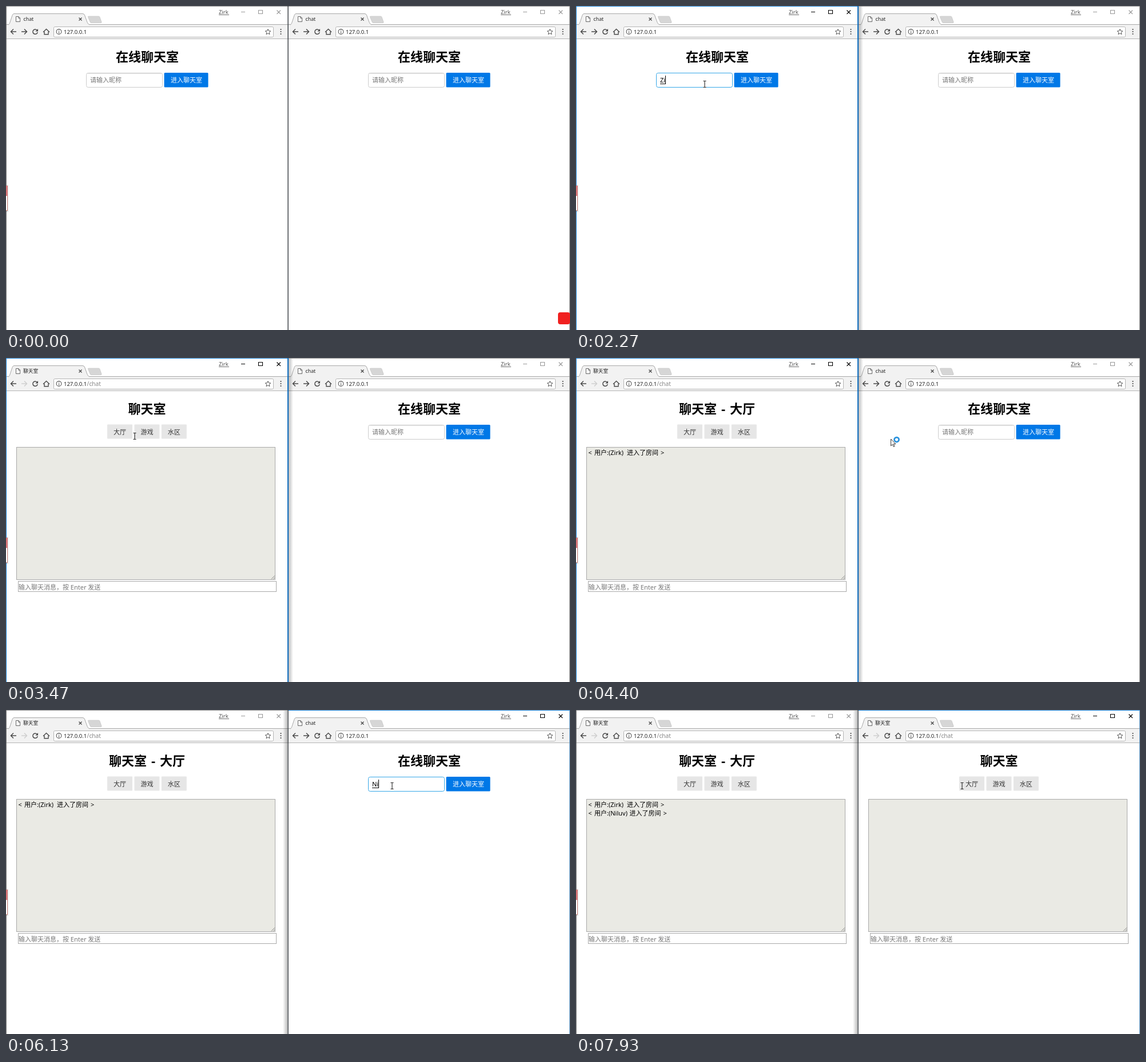
An HTML page for the animation above (8 s loop, 986 by 568 pixels).

```html
<!DOCTYPE html>
<html lang="zh-CN">
<head>
<meta charset="utf-8">
<style>
html, body { margin: 0; width: 100%; height: 100%; overflow: hidden; background: #fff; }
svg { display: block; width: 986px; height: 568px; }
text { font-family: "Noto Sans", "Noto Sans CJK SC", sans-serif; white-space: pre; }
</style>
</head>
<body>
<svg id="stage" viewBox="0 0 986 568"></svg>
<script>
const stage = document.getElementById('stage');
const LOOP = 8000, STEP = 1000 / 15, HALF = 493;
const pen = document.createElement('canvas').getContext('2d');
pen.font = '11px "Noto Sans", "Noto Sans CJK SC", sans-serif';

// Timeline of each window: key times, and the blink phases when the caret is hidden
const users = [
  { name: 'Zirk', keys: [1800, 2270, 2400, 2600], commit: 3000, focus: 930,
    load: 3270, page: 3470, joined: 3670, hidden: [[1470, 1800]] },
  { name: 'Niluv', keys: [5930, 6130, 6270, 6400, 6670], commit: 6670, focus: 4730,
    load: 7400, page: 7730, joined: 7930, hidden: [[5270, 5800], [7200, 7400]] }
];

const text = (x, y, s, size = 11, fill = '#000', more = '') =>
  `<text x="${x}" y="${y}" font-size="${size}" fill="${fill}" ${more}>${s}</text>`;
const rect = (x, y, w, h, fill, more = '') =>
  `<rect x="${x}" y="${y}" width="${w}" height="${h}" fill="${fill}" ${more}/>`;
const line = (d, color, width = 1, more = '') =>
  `<path d="${d}" fill="none" stroke="${color}" stroke-width="${width}" ${more}/>`;
const group = (x, y, body) => `<g transform="translate(${x} ${y})">${body}</g>`;
const title = (x, s) => text(x, 97, s, 22, '#000', 'font-weight="700"');

function spinner(t) {
  const turn = -(t - 7670) * 0.36;
  return line('M19 19.6Q20.5 18.4 22.5 18.6', '#888', 1.2, `transform="rotate(${turn} 21 23)"`);
}

function chrome(u, t, active) {
  const loading = t >= u.load && t < u.page, moved = t >= u.load;
  const ink = '#4a4a4a', frame = active ? '#000' : '#999';
  let s = rect(0, 33, HALF, 24.5, '#f2f2f2') + line('M0 32.5H493', '#a8a8a8');
  s += '<path d="M4 33C6 32 6.5 30 7.5 27L11 16.5Q12 13.5 14 13.5H134Q136.5 13.5 137.5 16L142 28.5Q143.5 32 146 33" fill="#f2f2f2" stroke="#a8a8a8"/>';
  s += rect(5.5, 32.6, 139, 1, '#f2f2f2');
  s += '<path d="M144 18H162Q163.5 18 164 19.5L167 28Q167.5 29.5 166 29.5H149Q147.5 29.5 147 28L143.5 19.5Q143 18 144 18Z" fill="#d6d6d6" stroke="#c4c4c4" stroke-width=".7"/>';
  s += line('M0 57.5H493', '#b4b4b4');
  s += loading ? spinner(t)
    : '<path d="M17.5 18.5H22L24.5 21V27.5H17.5ZM21.8 18.5V21.3H24.5" fill="#fff" stroke="#555" stroke-width=".9"/>';
  s += loading ? text(31, 26.2, '127.0.0.1/chat', 8.4, '#222')
    : moved ? text(30, 26.3, '聊天室', 8.7, '#222') : text(30.5, 26.2, 'chat', 8.8, '#222');
  s += line('M127.5 20.5L132.5 25.5M132.5 20.5L127.5 25.5', '#444', 1.2);

  // navigation buttons
  s += line('M18 45H9M13 40.5L8.5 45L13 49.5', ink, 1.5);
  s += line('M27 45H36M32 40.5L36.5 45L32 49.5', moved ? '#cfcfcf' : ink, 1.5);
  s += loading ? line('M47.5 41.5L54.5 48.5M54.5 41.5L47.5 48.5', ink, 1.5)
    : line('M54.2 42.3A4.2 4.2 0 1 0 55.2 46', ink, 1.5) + '<path d="M56 40V44.5H51.5Z" fill="#4a4a4a"/>';
  s += line('M65 45.7L70.5 40.5L76 45.7M67 45V49.7H74V45', ink, 1.4);
  s += rect(83.5, 36.5, 384, 18, '#fff', 'rx="2" stroke="#b4b4b4"');
  s += '<circle cx="92.5" cy="45" r="4.4" fill="none" stroke="#555" stroke-width="1.1"/>';
  s += rect(92, 42.4, 1.1, 1.2, '#555') + rect(92, 44.5, 1.1, 3.2, '#555');
  s += text(101, 48.6, '127.0.0.1', 9.5, '#222');
  if (moved) s += text(141.6, 48.6, '/chat', 10.2, '#888');
  s += line('M458 40.5l1.4 3.2 3.4.3-2.6 2.3.8 3.4-3-1.8-3 1.8.8-3.4-2.6-2.3 3.4-.3z', '#555');
  for (const y of [41, 45, 49]) s += `<circle cx="480.5" cy="${y}" r="1.1" fill="#444"/>`;

  // title bar
  s += text(372, 14, users[0].name, 9.4, '#555') + line('M372 15.5H390', '#666', .9);
  s += line('M411 10.5H418M441.5 7.5H448.5V13.5H441.5ZM473.5 7.5L480 14M480 7.5L473.5 14', frame, 1.1);
  return s;
}

function login(u, t) {
  const focused = t >= u.focus;
  const typed = u.name.slice(0, u.keys.filter(k => t >= k).length);
  const end = typed ? 147 + pen.measureText(typed).width : 146;
  let s = title(192, '在线聊天室');
  s += rect(140.5, 117.5, 133, 25, '#fff', `rx="3" stroke="${focused ? '#35a7e8' : '#ccc'}"`);
  if (!focused) s += line('M142 118.5H272', '#e4e4e4');
  s += typed ? text(147, 134, typed) : text(147, 134.3, '请输入昵称', 11, '#777');
  if (typed && t < u.commit) s += line(`M147 136.5H${end}`, '#000');
  if (focused && !u.hidden.some(([a, b]) => t >= a && t < b))
    s += rect(Math.round(end), 122, 1, 15, '#000');
  return s + rect(276.5, 117, 77, 25.5, '#0078e7', 'rx="1.5"') + text(288, 134.3, '进入聊天室', 11, '#fff');
}

function message(name, y) {
  return text(21.5, y, '&lt;') + text(32, y, `用户:(${name})`) +
    text(name.length > 4 ? 93.5 : 89, y, '进入了房间') + text(name.length > 4 ? 152.5 : 148, y, '&gt;');
}

function room(u, t) {
  const inRoom = t >= u.joined && u === users[0];
  let s = inRoom ? title(180, '聊天室') + title(254, '-') + title(269, '大厅') : title(213.5, '聊天室');
  ['大厅', '游戏', '水区'].forEach((label, i) => {
    const x = 177 + i * 47.4;
    s += rect(x, 116.5, 44, 25, '#e6e6e6', 'rx="1"') + text(x + 11, 133.7, label, 11, '#333');
  });
  s += rect(18.5, 156.5, 452, 232, '#eaeae4', 'stroke="#a9a9a9"');
  s += line('M464 387.5L470 381.5M467.5 387.5L470 385', '#777', .9);
  s += rect(21.5, 391.5, 451, 18, '#fff', 'stroke="#a9a9a9"');
  s += text(22, 405.5, '输入聊天消息，按 Enter 发送', 11, '#777');
  if (inRoom) users.forEach((v, i) => {
    if (t >= v.joined) s += message(v.name, 170 + i * 14.5);
  });
  return s;
}

// Eased glide between two points with a slight bulge
function glide(t, start, end, a, b, power, bulge) {
  const u = Math.min(1, Math.max(0, (t - start) / (end - start)));
  const e = 1 - (1 - u) ** power;
  return [a[0] + (b[0] - a[0]) * e, a[1] + (b[1] - a[1]) * e + bulge * Math.sin(Math.PI * u)];
}

function pointer(t) {
  const q = Math.floor((t + 4) / STEP) * STEP;
  if (t < 130) return '';
  const [x, y] = t < 4200
    ? glide(q, 67, 800, [780, 575], [225, 137], 1.9, 0)
    : glide(q, 4133, 4667, [225, 137], [675, 132.5], 1.86, 8.3);
  const loading = users.some(u => t >= u.load && t < u.page);
  const local = x % HALF;
  const beam = !loading && (local > 140 && local < 274 && y > 117 && y < 143) && (t < 4200 || x > HALF);
  if (beam) return group(Math.round(x), Math.round(y), line('M-2.5 -5.5H-.5L0 -5L.5 -5.5H2.5M0 -5V5M-2.5 5.5H-.5L0 5L.5 5.5H2.5', '#222', 1.1));
  const busy = t >= 4270 && t < 4670 && x > HALF;
  return group(x - .5, y, '<path d="M0 0V12L2.8 9.4L4.7 13.6L6.5 12.8L4.6 8.7H8.4Z" fill="#fff" stroke="#222" stroke-width=".9"/>' +
    (busy ? '<circle cx="10" cy="1" r="4" fill="#fff" stroke="#2b93dd" stroke-width="2.8"/>' : ''));
}

const shadow = `<defs><linearGradient id="shade">
  <stop offset="0" stop-color="#000" stop-opacity=".26"/><stop offset="1" stop-color="#000" stop-opacity="0"/>
</linearGradient></defs>`;

function borders(active) {
  const edge = i => active === i ? '#1580d8' : '#909090';
  let s = line('M0 .5H493', edge(0)) + line('M493 .5H986', edge(1));
  s += line('M.5 0V568', active === 0 ? '#1580d8' : '#777') + line('M985.5 0V568', active === 1 ? '#4a88bb' : '#777');
  if (active === 0) s += rect(494, 1, 8, 567, 'url(#shade)');
  if (active === 1) s += rect(-492, 1, 8, 567, 'url(#shade)', 'transform="scale(-1 1)"');
  return s + (active === 0 ? rect(492, 0, 2, 568, '#0f6cbd') : rect(492.4, 0, 1.4, 568, '#33393e'));
}

function scene(t) {
  const active = t < 870 ? -1 : t < 4670 ? 0 : 1;
  let s = shadow + rect(0, 0, 986, 568, '#fff');
  users.forEach((u, i) => {
    s += group(i * HALF, 0, chrome(u, t, active === i) + (t < u.page ? login(u, t) : room(u, t)));
  });
  s += borders(active);
  s += rect(0, 314, 4, 47, '#000', 'opacity=".12"') + rect(-2, 315.5, 4.5, 43, '#fff', 'stroke="#c98078"') + rect(0, 315, 2.5, 18, '#d9777b');
  if (t < 130) s += rect(965, 537, 21, 21, '#f0201f', 'rx="4"');
  return s + pointer(t);
}

let last = '';
function draw(now) {
  const s = scene(now % LOOP);
  if (s !== last) stage.innerHTML = last = s;
  requestAnimationFrame(draw);
}
draw(0);
</script>
</body>
</html>
```
